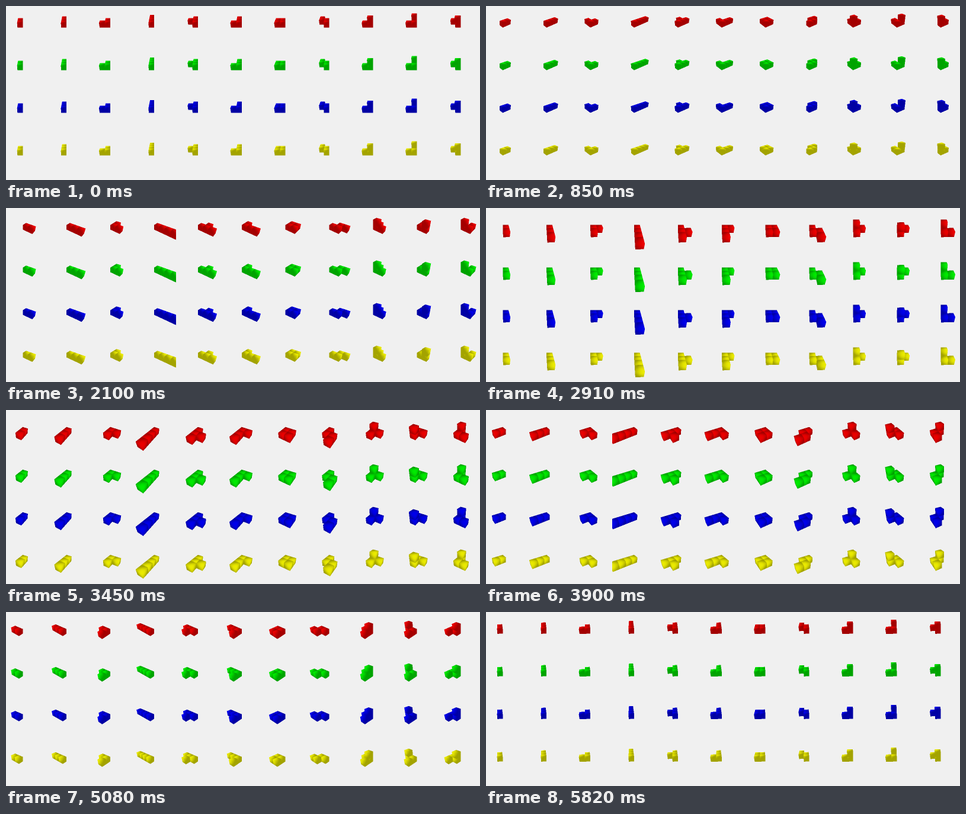
Animation, 800 px wide and 294 px high, one loop 5870 ms. Source, as an HTML page with a canvas:

```html
<!DOCTYPE html>
<html lang="en">
<head>
<meta charset="utf-8">
<title>Rotating polycubes</title>
<style>
  html, body { margin: 0; width: 100%; height: 100%; overflow: hidden; background: #f0f0f0; }
  canvas { display: block; }
</style>
</head>
<body>
<canvas id="stage" width="800" height="294"></canvas>
<script>
const LOOP = 5870, STEPS = 95, LEAD = 18;
const BG = 240, WIDTH = 800, HEIGHT = 294;

// Each cell is its own viewport; the turning axis runs through its centre.
const CELL_W = 73.9, CELL_H = 72, FIRST_X = 28.3, FIRST_Y = 36.5;
const CAM_Y = 5, CAM_Z = 7;
const DIST = Math.hypot(CAM_Y, CAM_Z), SIN = CAM_Y / DIST, COS = CAM_Z / DIST;
const FOCAL = CELL_H / 2 / Math.tan(25 * Math.PI / 180);

// Red, green and blue switches for each row.
const ROWS = [[1, 0, 0], [0, 1, 0], [0, 0, 1], [1, 1, 0]];

// Cubes as "uvw" digits: along, across, up.
const PIECES = [
  "000 100",
  "000 100 200",
  "000 100 010",
  "000 100 200 300",
  "000 100 200 110",
  "000 100 200 010",
  "000 100 010 110",
  "000 100 110 210",
  "000 100 010 001",
  "000 100 010 101",
  "000 100 110 001"
].map(text => text.split(" ").map(cube => [...cube].map(Number)));

const SAMPLES = [[.25, .25], [.75, .25], [.25, .75], [.75, .75]];

const ctx = document.getElementById("stage").getContext("2d");
const image = ctx.createImageData(WIDTH, HEIGHT);
const data = image.data;

function project(u, v, w, sin, cos) {
  const x = u * sin - v * cos, z = -u * cos - v * sin;
  const scale = FOCAL / (DIST - z * COS - w * SIN);
  return [x * scale, (z * SIN - w * COS) * scale];
}

function bounds(piece, sin, cos) {
  const box = [CELL_W / 2, CELL_H / 2, -CELL_W / 2, -CELL_H / 2];
  for (const [u, v, w] of piece) {
    for (let i = 0; i < 8; i++) {
      const [x, y] = project(u + (i & 1), v + (i >> 1 & 1), w + (i >> 2), sin, cos);
      box[0] = Math.min(box[0], x);
      box[1] = Math.min(box[1], y);
      box[2] = Math.max(box[2], x);
      box[3] = Math.max(box[3], y);
    }
  }
  return [Math.max(box[0], -CELL_W / 2), Math.max(box[1], -CELL_H / 2),
          Math.min(box[2], CELL_W / 2), Math.min(box[3], CELL_H / 2)];
}

// Brightness where the ray first meets the piece, or 0 for a miss.
function trace(piece, eye, ray) {
  let nearest = Infinity, hit = null;
  for (const cube of piece) {
    let enter = 0, leave = Infinity;
    for (let i = 0; i < 3; i++) {
      const a = (cube[i] - eye[i]) / ray[i], b = (cube[i] + 1 - eye[i]) / ray[i];
      enter = Math.max(enter, Math.min(a, b));
      leave = Math.min(leave, Math.max(a, b));
    }
    if (enter < leave && enter < nearest) {
      nearest = enter;
      hit = cube;
    }
  }
  if (!hit) return 0;
  // Smooth normals, lit from the far +u +v +w corner.
  const n = hit.map((c, i) => eye[i] + ray[i] * nearest - c - .5);
  const lit = (n[0] + n[1] + n[2]) / Math.hypot(...n) / Math.sqrt(3);
  return .64 + .28 * Math.max(0, lit);
}

function paint(x, y, cover, level) {
  ROWS.forEach((tint, row) => {
    const at = ((y + row * CELL_H) * WIDTH + x) * 4;
    for (let c = 0; c < 3; c++) {
      data[at + c] = BG * (1 - cover) + 255 * level * tint[c];
    }
  });
}

function drawPiece(piece, col, sin, cos) {
  const cx = FIRST_X + col * CELL_W;
  const [left, top, right, bottom] = bounds(piece, sin, cos);
  const eye = [-CAM_Z * cos, -CAM_Z * sin, CAM_Y];
  const x0 = Math.max(0, Math.floor(cx + left)), x1 = Math.min(WIDTH, Math.ceil(cx + right));
  const y0 = Math.floor(FIRST_Y + top), y1 = Math.ceil(FIRST_Y + bottom);
  for (let y = y0; y < y1; y++) {
    for (let x = x0; x < x1; x++) {
      let hits = 0, sum = 0;
      for (const [sx, sy] of SAMPLES) {
        const px = x + sx - cx, py = y + sy - FIRST_Y;
        if (px < left || px > right || py < top || py > bottom) continue;
        const rz = py * SIN - FOCAL * COS;
        const level = trace(piece, eye,
          [px * sin - rz * cos, -px * cos - rz * sin, -py * COS - FOCAL * SIN]);
        if (level) hits++;
        sum += level;
      }
      if (hits) paint(x, y, hits / 4, sum / 4);
    }
  }
}

function draw(step) {
  const angle = step / STEPS * 2 * Math.PI;
  const sin = Math.sin(angle), cos = Math.cos(angle);
  data.fill(BG);
  for (let i = 3; i < data.length; i += 4) data[i] = 255;
  PIECES.forEach((piece, col) => drawPiece(piece, col, sin, cos));
  ctx.putImageData(image, 0, 0);
}

let shown = -1;
const start = performance.now();

function tick() {
  const time = Math.max(0, performance.now() - start) % LOOP;
  const step = Math.min(STEPS - 1, Math.floor((time + LEAD) / LOOP * STEPS));
  if (step !== shown) draw(shown = step);
  requestAnimationFrame(tick);
}
tick();
</script>
</body>
</html>
```
